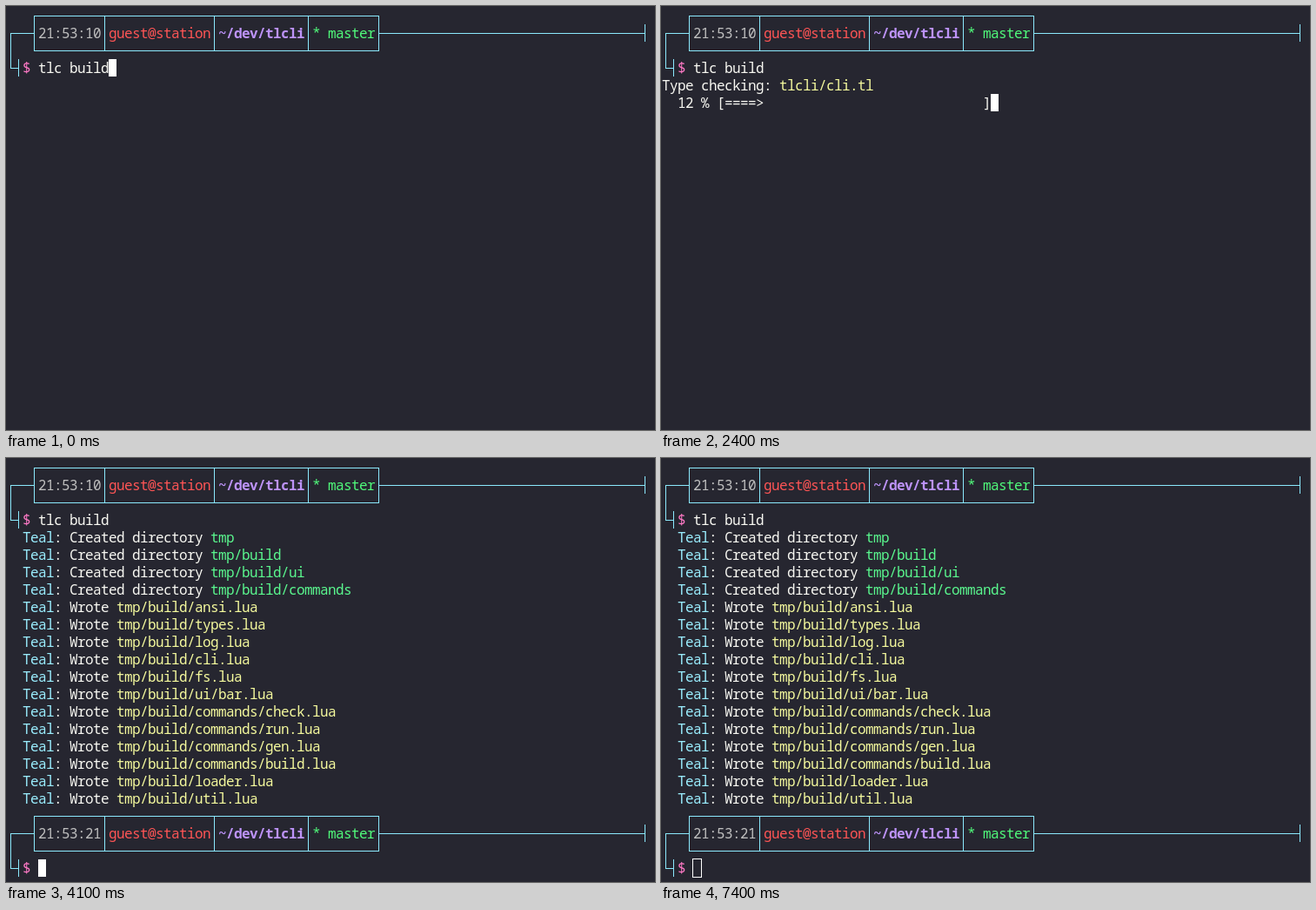
These frames come from a looping animation (746x487 px, 8.8 s). An HTML page:

```html
<!DOCTYPE html>
<html lang="en">
<head>
<meta charset="utf-8">
<title>Terminal build</title>
<style>
  html, body { margin: 0; width: 100%; height: 100%; overflow: hidden; background: #262630; }
  svg { display: block; }
  text {
    font: 500 16px "Noto Sans Mono", "DejaVu Sans Mono", monospace;
    letter-spacing: -0.6px;
    font-variant-ligatures: none;
    white-space: pre;
  }
  .bold { font-weight: 700; }
  .frame { fill: none; stroke: #8be9fd; shape-rendering: crispEdges; }
</style>
</head>
<body>
<svg id="screen" width="746" height="487" viewBox="0 0 746 487"></svg>
<script>
const LOOP = 8800, CELL_W = 9, CELL_H = 20;
const color = {
  white: '#f8f8f2', grey: '#bfbfbf', red: '#ff5555', purple: '#bd93f9', pink: '#ff79c6',
  branch: '#50fa7b', green: '#5af78e', yellow: '#f4f99d', cyan: '#9aedfe'
};
const screen = document.getElementById('screen');
const x = col => 1 + col * CELL_W;
const y = row => 1 + row * CELL_H;

function add(parent, tag, attrs = {}, content = '') {
  const node = document.createElementNS('http://www.w3.org/2000/svg', tag);
  for (const key in attrs) node.setAttribute(key, attrs[key]);
  node.textContent = content;
  return parent.appendChild(node);
}

const group = () => add(screen, 'g');
const write = (parent, col, row, fill, content = '', className = '') =>
  add(parent, 'text', { x: x(col), y: y(row) + 16, fill, class: className }, content);

function prompt(parent, row, clock) {
  add(parent, 'path', {
    class: 'frame',
    transform: `translate(0 ${row * CELL_H})`,
    d: 'M32.5 11.5H428.5V51.5H32.5ZM113.5 11.5V51.5M239.5 11.5V51.5M347.5 11.5V51.5' +
       'M32.5 31.5H5.5V71.5H14.5M14.5 61V81M428.5 31.5H734.5M734.5 21V41'
  });
  write(parent, 4, row + 1, color.grey, clock);
  write(parent, 13, row + 1, color.red, 'guest@station');
  write(parent, 27, row + 1, color.purple, '~/dev/tlcli', 'bold');
  write(parent, 39, row + 1, color.branch, '* master');
  write(parent, 2, row + 3, color.pink, '$');
}

function logLine(parent, row, verb, path, fill) {
  write(parent, 2, row, color.cyan, 'Teal');
  write(parent, 6, row, color.white, `: ${verb} `);
  write(parent, 9 + verb.length, row, fill, path);
}

prompt(screen, 0, '21:53:10');
write(screen, 4, 3, color.white, 'tlc build');

const progress = group();
const action = write(progress, 0, 4, color.white);
const file = write(progress, 0, 4, color.yellow);
const bar = write(progress, 2, 5, color.white);

const result = group();
const folders = ['', '/build', '/build/ui', '/build/commands'];
const modules = ['ansi', 'types', 'log', 'cli', 'fs', 'ui/bar', 'commands/check', 'commands/run',
  'commands/gen', 'commands/build', 'loader', 'util'];
folders.forEach((name, i) => logLine(result, 4 + i, 'Created directory', 'tmp' + name, color.green));
modules.forEach((name, i) => logLine(result, 8 + i, 'Wrote', `tmp/build/${name}.lua`, color.yellow));
prompt(result, 20, '21:53:21');

const cursor = add(screen, 'rect', { width: CELL_W, height: CELL_H, fill: '#fff' });
const idleCursor = add(screen, 'rect', {
  x: 36.5, y: 460.5, width: 10, height: 21, fill: 'none', stroke: '#fff', 'shape-rendering': 'crispEdges'
});

const stages = [
  { at: 2400, label: 'Type checking: ', path: 'tlcli/cli.tl', percent: 12 },
  { at: 3900, label: 'Type checking: ', path: 'tlcli/commands/gen.tl', percent: 45 },
  { at: 4000, label: 'Writing: ', path: 'tmp/build/commands/check.lua', percent: 74 }
];
const DONE = 4100, UNFOCUSED = 7400;
const blinks = [600, 1200, 1800, 2300, 3000, 3600, 4200, 4800, 5400, 6000, 6800, 7300];

const show = (node, visible) => node.setAttribute('display', visible ? 'inline' : 'none');

function showStage({ label, path, percent }) {
  action.textContent = label;
  file.textContent = path;
  file.setAttribute('x', x(label.length));
  const filled = '='.repeat(Math.ceil(percent * 0.31)) + '>';
  bar.textContent = `${percent} % [${filled.padEnd(33)}]`;
}

function render(t) {
  const stage = stages.filter(s => s.at <= t).pop();
  const done = t >= DONE;
  if (stage) showStage(stage);
  show(progress, stage && !done);
  show(result, done);

  const [col, row] = done ? [4, 23] : stage ? [42, 5] : [13, 3];
  cursor.setAttribute('x', x(col));
  cursor.setAttribute('y', y(row));
  const lit = blinks.filter(at => at <= t).length % 2 === 0;
  show(cursor, lit && t < UNFOCUSED);
  show(idleCursor, t >= UNFOCUSED);
}

const start = performance.now();
function tick() {
  render((performance.now() - start) % LOOP);
  requestAnimationFrame(tick);
}
tick();
</script>
</body>
</html>
```
